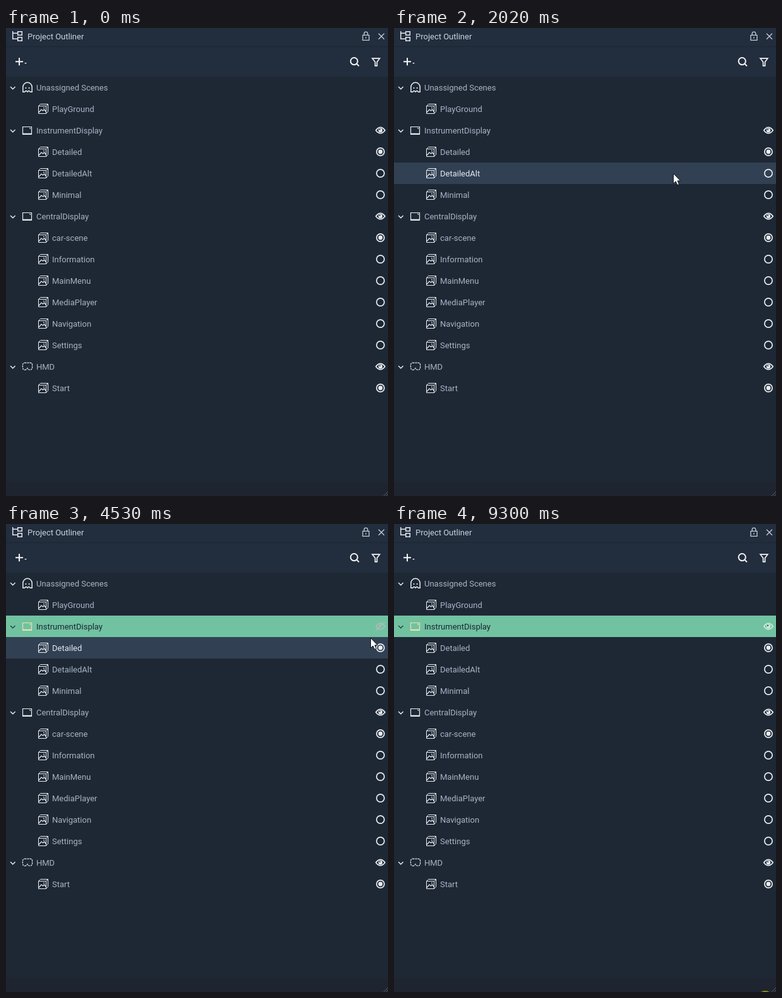
Animation of 605x741 px, one loop 9.43 s. Source, as an HTML page:

```html
<!DOCTYPE html>
<html lang="en">
<head>
<meta charset="utf-8">
<title>Project Outliner</title>
<style>
html, body { margin: 0; width: 100%; height: 100%; overflow: hidden; background: #1e2835; }
svg { display: block; width: 605px; height: 741px; font: 13px Roboto, Arial, sans-serif; }
.line { fill: none; stroke: currentColor; }
.row { color: #e9edf2; }
.row .bg { fill: none; }
.row text { fill: #a8b4c4; }
.row.hover .bg { fill: #324053; }
.row.hover text { fill: #e4e9f0; }
.row.selected .bg { fill: #71c2a1; }
.row.selected text { fill: #1b2733; }
.row.selected .chevron { color: #23483f; }
.row.selected .kind { color: #e9e3b0; }
.row.selected .eye { color: #cdeadd; }
.row.selected .eye.off { color: #a9bdb4; }
.eye .slash, .eye.off .pupil { display: none; }
.eye.off .slash { display: inline; }
</style>
</head>
<body>
<svg viewBox="0 0 605 741" xmlns="http://www.w3.org/2000/svg">
  <rect width="605" height="77" fill="#222d3d"/>
  <rect y="29" width="605" height="1" fill="#1b2532"/>
  <rect y="719" width="605" height="22" fill="#1f2530"/>
  <path d="M598 741L605 734M602 741L605 738" stroke="#55606e"/>

  <g class="line" color="#e3e8ee" stroke-width="1.5">
    <path d="M10.7 5V17.3H18M10.7 8.3H18"/>
    <path d="M18.7 5.7h6.6v5.6h-6.6zM18.7 14.7h6.6v5.6h-6.6z"/>
  </g>
  <text x="34" y="18" fill="#cbd4df">Project Outliner</text>
  <g class="line" color="#c4cdd7" stroke-width="1.3">
    <path d="M565 11.3h10v8h-10zM567.2 11V9a2.8 2.8 0 0 1 5.6 0v2M570 14v2.6"/>
    <path d="M590 8.7l9 9M599 8.7l-9 9"/>
  </g>
  <g class="line" color="#f0f3f6" stroke-width="2">
    <path d="M15 53.3H27M21 47.3V59.3"/>
    <circle cx="551.3" cy="52.6" r="5.6"/>
    <path d="M555.3 56.6l3.7 3.7"/>
    <path stroke-width="1.7" d="M580.2 48.2H591.8L587.6 53.7V59.8H584.6V53.7Z"/>
  </g>
  <path d="M29 55h4l-2 2z" fill="#dfe4ea"/>

  <g id="rows"></g>
  <circle id="click" r="13" fill="#ff0" fill-opacity=".5"/>
  <path id="pointer" d="M-.5 -.5V15.3L3.2 11.9L5.8 17.6L8.5 16.4L6 10.9H10.6Z"
        fill="#fff" stroke="#10151c"/>
</svg>
<script>
const LOOP = 9430, STEP = 70, TOP = 77, ROW = 34;

const line = (d, w = 1.2) => `<path class="line" stroke-width="${w}" d="${d}"/>`;
const dot = (x, y, r) => `<circle cx="${x}" cy="${y}" r="${r}" fill="currentColor"/>`;

// Icons are drawn around the middle of their row.
const icons = {
  ghost: line('M26.8 7.2V-.5a7.2 7.2 0 0 1 14.4 0V7.2H38.2L36.8 5.4H35.6L34 7.2L32.4 5.4H31.2L29.8 7.2Z', 1.5)
    + dot(31.4, 1, 1.1) + dot(36.6, 1, 1.1),
  display: line('M26.5 -5.5H40.5V6H26.5Z') + line('M26 5.8H41', 2.2) + line('M37 -3.5H38.5V-2', 1),
  headset: `<g stroke-dasharray="3 1">${line('M29.5 -5.8H38.5Q41.6 -5.8 41.6 -2.5V1Q41.6 5.3 38 5.3Q35.5 5.3 34 2.5Q32.5 5.3 30 5.3Q26.4 5.3 26.4 1V-2.5Q26.4 -5.8 29.5 -5.8Z')}</g>`,
  scene: line('M51.5 -4.5H63.5V7.5H51.5ZM51.5 -4.5L54.5 -7.5H66.5V4.5L63.5 7.5M63.5 -4.5L66.5 -7.5', 1)
    + line('M52 5.5L56 1L58.5 3L60.5 1L63.5 4.5') + dot(60, -1.6, .9)
};
const chevron = `<g class="chevron">${line('M7 -1L10.8 2.8L14.6 -1', 1.4)}</g>`;
const eye = `<g class="eye">
  ${line('M585.8 0Q589.2 -4.7 593 -4.7T600.2 0Q596.8 4.7 593 4.7T585.8 0Z', 1.7)}
  <g class="pupil">${dot(593, 0, 3.2)}<circle cx="592" cy="-1.2" r="1.1" fill="#1e2835"/></g>
  <g class="slash">${line('M586.3 6.3L599.8 -6.5', 1.6)}${line('M590.6 1.2A2.8 2.8 0 0 1 594.5 -2.2')}</g></g>`;
const radio = on => `<circle class="line" cx="593" r="6.1" stroke-width="1.7"/>${on ? dot(593, 0, 3.4) : ''}`;

const groups = [
  ['Unassigned Scenes', 'ghost', ['PlayGround']],
  ['InstrumentDisplay', 'display', ['Detailed', 'DetailedAlt', 'Minimal']],
  ['CentralDisplay', 'display', ['car-scene', 'Information', 'MainMenu', 'MediaPlayer', 'Navigation', 'Settings']],
  ['HMD', 'headset', ['Start']]
];
const parts = [];
function addRow(x, label, kind, extra) {
  const y = TOP + ROW * (parts.length + .5);
  parts.push(`<g class="row" transform="translate(0 ${y})">
    <rect class="bg" y="-17" width="605" height="34"/>
    <g class="kind">${icons[kind]}</g>${extra}<text x="${x}" y="5">${label}</text></g>`);
}
for (const [label, kind, scenes] of groups) {
  const assigned = kind !== 'ghost';
  addRow(48, label, kind, chevron + (assigned ? eye : ''));
  scenes.forEach((name, i) => addRow(73, name, 'scene', assigned ? radio(i === 0) : ''));
}

const byId = id => document.getElementById(id);
byId('rows').innerHTML = parts.join('');
const rows = [...document.querySelectorAll('.row')];
const target = rows[2], targetEye = target.querySelector('.eye');
const pointer = byId('pointer'), click = byId('click');

const mix = (a, b, f) => a + (b - a) * f;
const easeIn = (f, power) => f ** power;
const easeOut = (f, power) => 1 - (1 - f) ** power;
const wave = f => Math.sin(Math.PI * f);

// Each move maps its progress 0..1 to a point; the pointer rests between moves.
const moves = [
  { start: 0, end: STEP, at: () => [490, 760] },
  { start: 70, end: 210, at: f => [mix(479, 437, f), mix(729, 745, f)] },
  { start: 570, end: 850, at: f => [mix(436, 364, f), mix(733, 692, easeOut(f, 1.5))] },
  { start: 1040, end: 1740, at: f => [mix(364, 347, f), mix(690, 385, easeIn(f, 1.5))] },
  { start: 1740, end: 2930, at: f => [mix(347, 592, easeOut(f, 1.86)), mix(385, 163, easeOut(f, 4.4))] },
  { start: 4180, end: 4820, at: f => [593 - 15 * wave(f), 161 + 50 * wave(f ** 3.4)] },
  { start: 7620, end: 8040, at: f => [mix(595, 588, f), mix(178, 752, easeIn(f, 1.5))] }
];
const clicks = [[3080, 3260], [5090, 5220], [6010, 6080], [6940, 7070], [9300, LOOP]];
const hidden = [[3590, 5220], [6080, 7070]];
const selectAt = 3170;
const within = (t, spans) => spans.some(([a, b]) => t >= a && t < b);

function pointerAt(t) {
  const { start, end, at } = moves.filter(m => m.start <= t).pop();
  const time = Math.floor((t - start) / STEP) * STEP;
  return at(Math.min(1, time / (end - start))).map(Math.round);
}

function draw(t) {
  const [x, y] = pointerAt(t);
  const place = `translate(${x} ${y})`;
  pointer.setAttribute('transform', place);
  click.setAttribute('transform', place);
  click.style.display = within(t, clicks) ? '' : 'none';
  const over = Math.floor((y - TOP) / ROW);
  rows.forEach((row, i) => row.classList.toggle('hover', i === over));
  target.classList.toggle('selected', t >= selectAt);
  targetEye.classList.toggle('off', within(t, hidden));
}

const began = performance.now();
function tick() {
  draw((performance.now() - began) % LOOP);
  requestAnimationFrame(tick);
}
tick();
</script>
</body>
</html>
```
